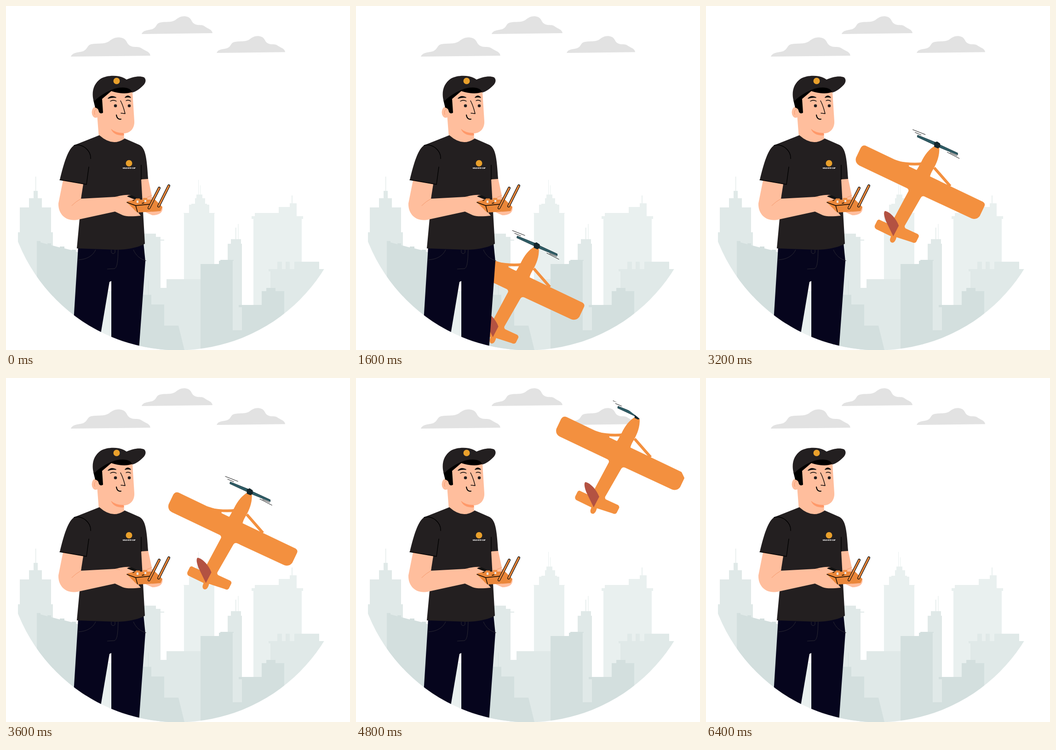
Recreate the animation shown at these times as an HTML page. Size 748x748 px, loop 6.6 s.

```html
<!DOCTYPE html>
<html lang="en">
<head>
<meta charset="utf-8">
<title>Pilot and model plane</title>
<style>
  html, body { margin: 0; width: 100%; height: 100%; overflow: hidden; background: #fff; }
  svg { display: block; width: 100%; height: 100%; }
  .light { fill: #e9f0ef; }
  .mid { fill: #e0e9e8; }
  .dark { fill: #d3dfde; }
  .skin { fill: #ffbe9d; }
  .cloth { fill: #231f20; }
  .orange { fill: #f3903f; }
  .line { fill: none; stroke: #000; stroke-width: 1.4; stroke-linecap: round; stroke-linejoin: round; }
  .crease { fill: none; stroke: #f5996c; stroke-width: 1; stroke-linecap: round; }
  .seam { fill: none; stroke: #2b2a33; stroke-width: 1; }
  .emblem { fill: #e9a02b; }
</style>
</head>
<body>
<svg viewBox="0 0 748 748">
  <defs>
    <clipPath id="disc"><circle cx="374" cy="374" r="374.5"/></clipPath>
    <path id="cloud" d="M0 39C3 30 15 31 24 28C33 24 31 16 40 14C51 11 64 15 74 8C82 1 91-2 101 2C110 6 107 14 117 18C124 21 131 17 138 23C145 28 153 29 154 37Z"/>
  </defs>

  <g clip-path="url(#disc)">
    <g fill="#e2e2e2">
      <use href="#cloud" transform="translate(141 68) scale(1.123 1.08)"/>
      <use href="#cloud" transform="translate(295 22)"/>
      <use href="#cloud" transform="translate(458 65) scale(.968 .95)"/>
    </g>

    <g id="city">
      <path class="light" d="M387 600V451H386V450H398V432H403V430H411V418H414V410H418V378H419V410H422V390H423V410H427V418H433V430H437V432H442V450H454V451H453V600Z"/>
      <path class="light" d="M538 655V463H534V457H541V450H593V437H617V429H621V412H623V429H632V457H646V463H643V655Z"/>
      <path class="light" d="M190 748V620H229V748Z"/>
      <path class="mid" d="M26 748V492H30V438H50V418H60V402H64V371H65.300V402H69V418H78V438H98V492H102V748Z"/>
      <path class="dark" d="M67 748V511H75V514L90 518V516H98V520L117 525V523H127V527L143 531V530H152V534L158 536V748Z"/>
      <path class="mid" d="M290 748V495H326V502H336V508H344V510H336V613H349V594H423V748Z"/>
      <path class="dark" d="M290 748V628H309V597H310V628H316V649H344V695H375L388 748Z"/>
      <path class="mid" d="M482 706V517H489V507H499V482H500.500V507H504.500V474H505.500V507H511V517H513V706Z"/>
      <path class="mid" d="M575 748V577H571V572H590V556H600V572H608V556H617V572H627V556H681V572H692V577H688V748Z"/>
      <path class="dark" d="M423 748V561H463V554H466V552H495V554H493V705H513V655H506V650H556V620H566V613H586V620H605V748Z"/>
    </g>

    <g id="plane">
      <path d="M504 159L532 170M509 165L523 171M579 208L606 222M585 209L601 216" stroke="#111"/>
      <path d="M515 171L557 188V195L514 175ZM559 190L602 210L602 214L558 196Z" fill="#2f5d66" stroke="#1c3c44" stroke-linejoin="round"/>
      <g class="orange">
        <path d="M404 195L657 316Q663 320 660 326L650 347Q643 356 632 352L531 305Q525 302 522 307L487 368Q486 372 489 374L515 386Q519 389 517 393L512 403Q509 407 503 404L469 393Q466 405 460 405Q454 404 455 397L457 391L426 376Q420 373 422 367L427 357Q430 353 434 356L456 366L495 293Q496 288 491 286L388 237Q378 231 381 220L391 199Q396 191 404 195Z"/>
        <path d="M510 250C516 244 518 237 523 229C530 214 540 201 553 194L562 198C563 216 557 231 549 245C544 253 541 260 541 270Z"/>
        <path d="M464 224L496 234V243Z"/>
      </g>
      <path d="M469 230Q500 236 527 233M551 242L586 282" fill="none" stroke="#f3903f" stroke-width="6"/>
      <path d="M444 336C455 338 468 352 474 368L462 391L446 358C441 345 441 338 444 336Z" fill="#b35242"/>
      <path d="M552 188L557 186L563 190L563 196L559 199L552 196Z" fill="#14262c" stroke="#14262c" stroke-width="2" stroke-linejoin="round"/>
    </g>

    <g id="pilot">
      <path d="M157 520L299 515L303 555L289 748H229V598L225 600L200 748H143L156 540Z" fill="#06051d"/>
      <path class="seam" d="M157 552C176 551 189 543 195 530M277 530C282 542 292 551 305 554M244 530C243 550 243 568 236 571L220 572M229 530V536Q233 541 237 536V530"/>

      <path class="skin" d="M293 374L309 375L317 412L311 425H292Z"/>
      <path class="skin" d="M302 416Q312 410 319 416L340 437C342 448 334 455 318 455L303 448Z"/>
      <path class="skin" d="M199 200L230 180L275 186L279 250C280 267 269 277 256 277L258 300H203L198 235Z"/>
      <path class="cloth" d="M203 281Q232 307 258 288L290 302C303 309 306 327 309 376L294 377L302 517C287 525 265 530 240 530L154 527L160 463L165 387L117 378C125 345 135 308 150 302Z"/>

      <path class="skin" d="M124 379L168 387L163 419L238 415Q254 410 270 411L284 417L283 422L264 425L286 447L293 456Q264 459 254 455L237 447L159 464C132 471 113 454 114 429Z"/>
      <path class="line" d="M148 303C166 298 185 314 184 332M180 350L175 388L117 378M294 346V377"/>
      <path class="crease" d="M163 419Q152 425 143 434M239 415L247 417M318 447Q328 447 333 444M307 416L317 412"/>
      <path d="M263 414Q268 410 274 412L285 417L281 421L273 418Z" fill="#111"/>

      <path d="M262 426L278 421L324 421L340 437L336 446L287 449Q283 448 279 443Z" fill="#ea873a"/>
      <path class="line" d="M263 427L282 434L286 448M282 434L312 431M276 423L279 422M296 429L300 428"/>
      <path d="M283 420H290M299 419H306" stroke="#ea873a" stroke-width="3" stroke-linecap="round"/>
      <path d="M286 423V428M303 422V426" stroke="#e7e7e7" stroke-width="4"/>
      <path d="M311 439L333 396M332 435L354 391" stroke="#111" stroke-width="6" stroke-linecap="round"/>
      <path d="M311 439L333 396M332 435L354 391" stroke="#ea873a" stroke-width="3.500" stroke-linecap="round"/>

      <circle class="emblem" cx="267.500" cy="342" r="7"/>
      <text x="267.500" y="353.500" fill="#fff" text-anchor="middle" font-family="Inter, Arial, sans-serif" font-size="3.700" font-weight="900" font-style="italic">VELD KITE CUP</text>

      <ellipse class="skin" cx="195" cy="231" rx="8.500" ry="12"/>
      <path class="crease" d="M198 224Q190 225 193 236"/>
      <path d="M228 267Q240 277 256 276L257 281C243 283 232 277 228 267Z" fill="#ff996a"/>
      <path d="M190 205L194 221Q201 222 202 230Q205 236 211 232L209 202L229 185C244 190 260 192 275 187L271 174L230 174Z"/>
      <path class="cloth" d="M191 208C185 188 190 169 206 158C222 149 250 150 262 160C276 154 290 151 300 155C306 160 304 168 297 174C290 181 281 187 274 188C272 175 246 175 230 182C214 189 200 198 191 208Z"/>
      <circle class="emblem" cx="240.500" cy="163" r="7"/>
      <path d="M222 201Q229 193 239 199Q230 198 222 201ZM259 199Q265 192 271 199Q265 197 259 199Z" stroke="#111" stroke-width="1.500" stroke-linejoin="round"/>
      <path class="line" d="M227 207Q233 203 240 207M261 206Q266 203 271 207M249 206C254 215 257 226 259 234L250 233"/>
      <path class="line" style="stroke-width:2" d="M240 237C241 244 245 247 250 246"/>
      <circle cx="238" cy="217" r="3.300" fill="#231f20"/>
      <circle cx="268" cy="217" r="3.300" fill="#231f20"/>
    </g>
  </g>
</svg>
<script>
  const LOOP = 6600, STEP = 200, DRAWN_AT = 4000 / STEP;
  const VELOCITY = { x: 13.7, y: -27.42 }; // per step
  const plane = document.getElementById('plane');

  function draw() {
    const step = Math.floor(performance.now() % LOOP / STEP);
    const n = step - DRAWN_AT;
    plane.setAttribute('transform', `translate(${n * VELOCITY.x} ${n * VELOCITY.y})`);
    plane.setAttribute('visibility', step === 0 || step === LOOP / STEP - 1 ? 'hidden' : 'visible');
    requestAnimationFrame(draw);
  }
  draw();
</script>
</body>
</html>
```
